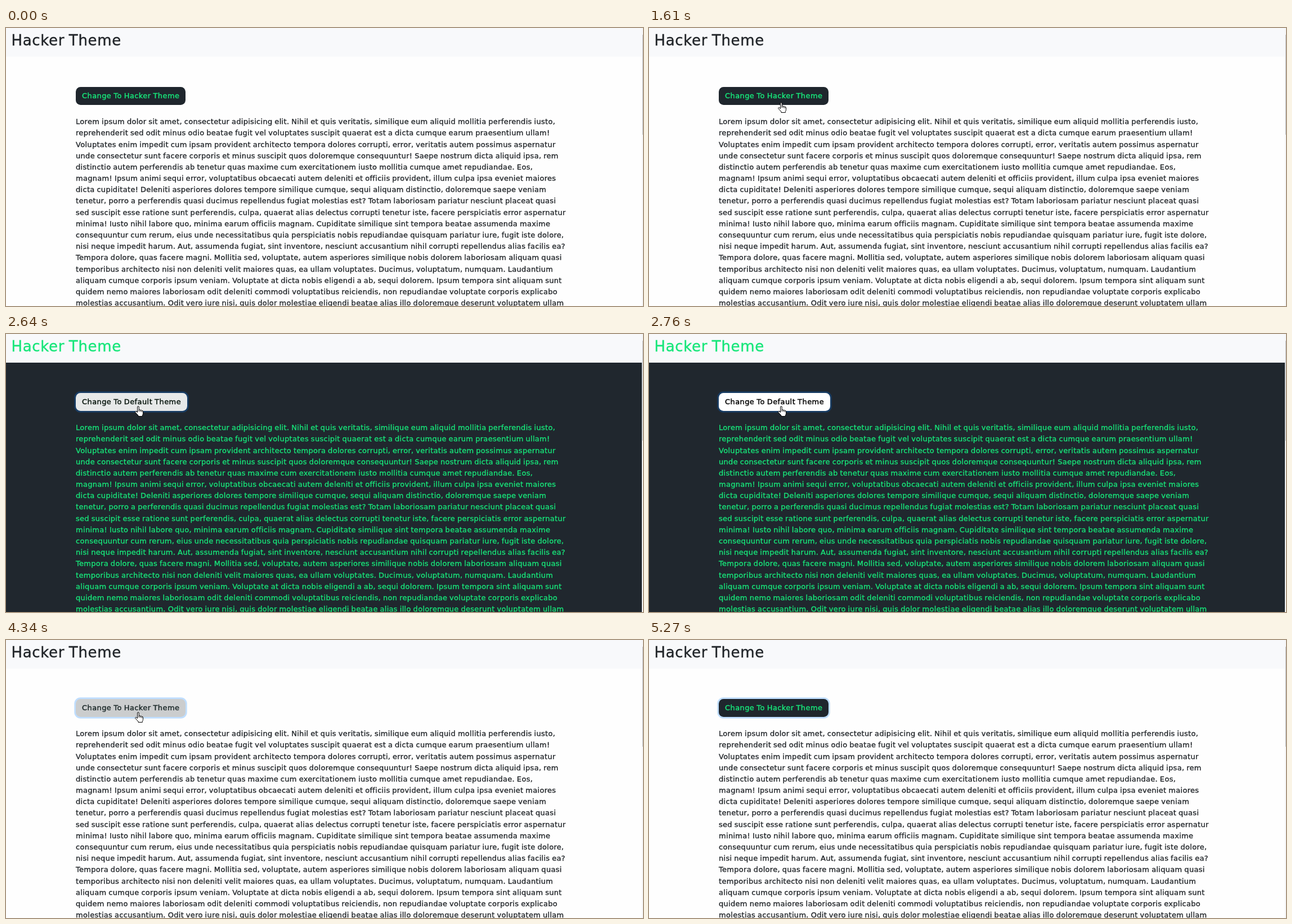
These frames come from a looping animation (1132x495 px, 6.52 s). An HTML page:

```html
<!DOCTYPE html>
<html lang="en">
<head>
<meta charset="utf-8">
<title>Hacker Theme</title>
<style>
  html, body { margin: 0; width: 100%; height: 100%; overflow: hidden; background: #fefefe; }
  svg { display: block; width: 1132px; height: 495px; }
  text { font: 13px "DejaVu Sans", sans-serif; letter-spacing: .3px; word-spacing: -.6px; white-space: pre; }
  #title { font-size: 26px; letter-spacing: .67px; word-spacing: -1.2px; stroke-width: .4px; }
  #label { letter-spacing: .42px; stroke-width: .4px; }
  #lines { stroke-width: .35px; }
  #page { --ink: #212529; --back: #fefefe; }
  #page.hacker { --ink: #17e67a; --back: #20272e; }
  #back { fill: var(--back); }
  #title, #lines { fill: var(--ink); stroke: var(--ink); }
</style>
</head>
<body>
<svg viewBox="0 0 1132 495">
  <g id="page">
    <rect id="back" width="1130" height="495"/>
    <rect width="1132" height="51" fill="#f8f9fb"/>
    <text id="title" x="9.5" y="31">Hacker Theme</text>
    <rect id="ring" x="121.3" y="102.3" height="37.4" rx="11" fill="#007bff" fill-opacity=".25"/>
    <rect id="button" x="124" y="105" height="32" rx="8.5"/>
    <text id="label" x="135" y="125"></text>
    <g id="lines"></g>
  </g>
  <rect x="1130" width="2" height="495" fill="#f4f4f5"/>
  <rect x="1131" y="12" width="1" height="178" fill="#bcbdbf"/>
  <path id="beam" d="M0 .5H2.5M3.5 .5H6M3 1V13M0 13.5H2.5M3.5 13.5H6" fill="none" stroke="#000"/>
  <g id="hand" fill="#fff" stroke="#000" stroke-linejoin="round">
    <path d="M4.6 11.5V2a1.3 1.3 0 0 1 2.6 0V7q2.3-.9 2.6.6 2.1-.7 2.5.7 2.2-.4 2.2 1.6v3.6q0 2-1.2 3.2v1.8H6V17L1 11.6Q.2 10 1.5 9.6 2.6 9.4 4.6 11.5Z"/>
    <path d="M7.2 7v3M9.8 7.6v2.8M12.3 8.3v2.6" fill="none"/>
  </g>
</svg>
<script>
const LOOP = 6520;
const $ = id => document.getElementById(id);

const copy = `Lorem ipsum dolor sit amet, consectetur adipisicing elit. Nihil et quis veritatis, similique eum aliquid mollitia perferendis iusto,
reprehenderit sed odit minus odio beatae fugit vel voluptates suscipit quaerat est a dicta cumque earum praesentium ullam!
Voluptates enim impedit cum ipsam provident architecto tempora dolores corrupti, error, veritatis autem possimus aspernatur
unde consectetur sunt facere corporis et minus suscipit quos doloremque consequuntur! Saepe nostrum dicta aliquid ipsa, rem
distinctio autem perferendis ab tenetur quas maxime cum exercitationem iusto mollitia cumque amet repudiandae. Eos,
magnam! Ipsum animi sequi error, voluptatibus obcaecati autem deleniti et officiis provident, illum culpa ipsa eveniet maiores
dicta cupiditate! Deleniti asperiores dolores tempore similique cumque, sequi aliquam distinctio, doloremque saepe veniam
tenetur, porro a perferendis quasi ducimus repellendus fugiat molestias est? Totam laboriosam pariatur nesciunt placeat quasi
sed suscipit esse ratione sunt perferendis, culpa, quaerat alias delectus corrupti tenetur iste, facere perspiciatis error aspernatur
minima! Iusto nihil labore quo, minima earum officiis magnam. Cupiditate similique sint tempora beatae assumenda maxime
consequuntur cum rerum, eius unde necessitatibus quia perspiciatis nobis repudiandae quisquam pariatur iure, fugit iste dolore,
nisi neque impedit harum. Aut, assumenda fugiat, sint inventore, nesciunt accusantium nihil corrupti repellendus alias facilis ea?
Tempora dolore, quas facere magni. Mollitia sed, voluptate, autem asperiores similique nobis dolorem laboriosam aliquam quasi
temporibus architecto nisi non deleniti velit maiores quas, ea ullam voluptates. Ducimus, voluptatum, numquam. Laudantium
aliquam cumque corporis ipsum veniam. Voluptate at dicta nobis eligendi a ab, sequi dolorem. Ipsum tempora sint aliquam sunt
quidem nemo maiores laboriosam odit deleniti commodi voluptatibus reiciendis, non repudiandae voluptate corporis explicabo
molestias accusantium. Odit vero iure nisi, quis dolor molestiae eligendi beatae alias illo doloremque deserunt voluptatem ullam`;

copy.split("\n").forEach((line, i) => {
  const row = document.createElementNS("http://www.w3.org/2000/svg", "text");
  row.setAttribute("x", 124);
  row.setAttribute("y", Math.round(171.2 + 20.18 * i));
  row.textContent = line;
  $("lines").append(row);
});

// time, hacker theme, button fill, label colour, focus ring
const looks = [
  [0, 0, "#1f262d", "#17e67a", 0],
  [2400, 0, "#22292f", "#17e67a", 0],
  [2490, 0, "#1f262d", "#17e67a", 0],
  [2640, 1, "#e7e9e9", "#07150d", 1],
  [2760, 1, "#ffffff", "#000000", 1],
  [4190, 1, "#fafafa", "#000000", 1],
  [4260, 1, "#ffffff", "#000000", 1],
  [4340, 0, "#cbcdce", "#1d2a2a", 1],
  [4430, 0, "#3a4147", "#1acb70", 1],
  [4490, 0, "#1f262d", "#17e67a", 1]
];

// time, pointer shape, left, top
const moves = [
  [0, ""],
  [360, "beam", 740, 421], [440, "beam", 620, 404], [520, "beam", 534, 395],
  [670, "beam", 455, 362], [750, "beam", 302, 300], [820, "beam", 233, 275],
  [1050, "beam", 234, 247], [1140, "beam", 237, 196], [1220, "beam", 239, 166],
  [1460, "beam", 238, 162], [1540, "hand", 229, 138], [1610, "hand", 229, 132],
  [1930, "hand", 229, 130], [2020, "hand", 229, 128],
  [4800, "beam", 352, 186], [4880, "beam", 610, 315], [4950, "beam", 761, 383],
  [5190, "beam", 773, 383], [5270, ""]
];

const at = (list, t) => list.findLast(step => step[0] <= t);

function draw(now) {
  const t = now % LOOP;
  const [, hacker, fill, ink, ring] = at(looks, t);
  const width = hacker ? 198 : 195;
  $("page").classList.toggle("hacker", !!hacker);
  $("button").setAttribute("width", width);
  $("button").setAttribute("fill", fill);
  $("ring").setAttribute("width", width + 5.4);
  $("ring").setAttribute("visibility", ring ? "visible" : "hidden");
  $("label").setAttribute("fill", ink);
  $("label").setAttribute("stroke", ink);
  $("label").textContent = `Change To ${hacker ? "Default" : "Hacker"} Theme`;

  const [, shape, x, y] = at(moves, t);
  for (const id of ["beam", "hand"]) {
    $(id).setAttribute("visibility", id === shape ? "visible" : "hidden");
    if (id === shape) $(id).setAttribute("transform", `translate(${x} ${y})`);
  }
}

const start = performance.now();
function tick() {
  draw(performance.now() - start);
  requestAnimationFrame(tick);
}
tick();
</script>
</body>
</html>
```
